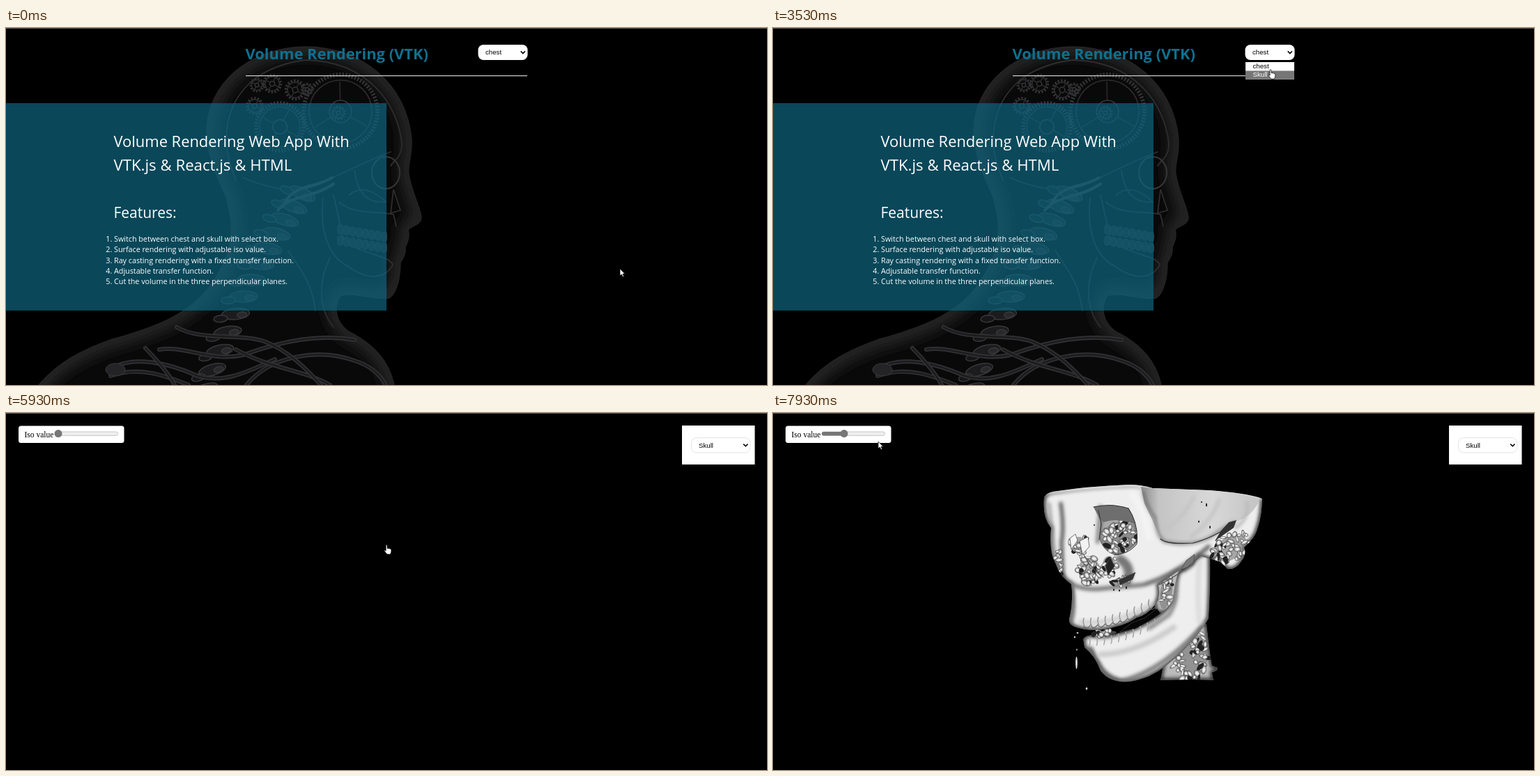
Animation of 1092x513 px, one loop 8000 ms. Source, as an HTML page:

```html
<!DOCTYPE html>
<html lang="en">
<head>
<meta charset="utf-8">
<title>Volume Rendering</title>
<style>
html, body { margin: 0; width: 100%; height: 100%; overflow: hidden; background: #000; }
svg { display: block; width: 1092px; height: 513px; }
.sans { font-family: "Open Sans", "Noto Sans", sans-serif; fill: #fff; }
.ui { font: 9.7px "Liberation Sans", Arial, sans-serif; }
.iso { font: 11.5px "Liberation Serif", "Times New Roman", serif; }
</style>
</head>
<body>
<svg id="stage" viewBox="0 0 1092 513">
  <defs>
    <filter id="mist" filterUnits="userSpaceOnUse" x="0" y="0" width="1092" height="513"><feGaussianBlur stdDeviation=".7"/></filter>
    <filter id="soft" filterUnits="userSpaceOnUse" x="0" y="0" width="1092" height="513"><feGaussianBlur stdDeviation="2.6"/></filter>
    <filter id="wide" filterUnits="userSpaceOnUse" x="0" y="0" width="1092" height="513"><feGaussianBlur stdDeviation="10"/></filter>
    <radialGradient id="lump"><stop stop-color="#fff"/><stop offset=".5" stop-color="#dcdcdc"/><stop offset=".85" stop-color="#808080"/><stop offset="1" stop-color="#333"/></radialGradient>
    <linearGradient id="temple" x1="0" x2="1"><stop stop-color="#8a8a8a"/><stop offset=".15" stop-color="#c4c4c4"/><stop offset=".6" stop-color="#d8d8d8"/><stop offset="1" stop-color="#c4c4c4"/></linearGradient>
  </defs>
  <g id="home">
    <g id="xray" fill="none"></g>
    <path d="M0 108H546V406H0Z" fill="#0e667f" fill-opacity=".7"/>
    <text x="343.5" y="44.5" class="sans" style="font-size:21.9px;font-weight:700;fill:#0f708f">Volume Rendering (VTK)</text>
    <path d="M344 68.7H748" stroke="#ccc" stroke-width="1.2"/>
    <g class="sans" id="copy"></g>
    <rect x="677.5" y="24" width="71" height="22" rx="7.5" fill="#fff"/>
    <text x="688" y="38" class="ui">chest</text>
    <path d="M738.7 33.4L741.8 36.5L744.9 33.4" fill="none" stroke="#000" stroke-width="1.6"/>
    <g id="menu" class="ui">
      <path d="M678 49H748V74H678Z" fill="#fff"/>
      <rect id="mark" x="678" width="70" height="12.3" fill="#767676"/>
      <text id="optA" x="688.5" y="58">chest</text>
      <text id="optB" x="688.5" y="70.2">Skull</text>
    </g>
  </g>
  <g id="view">
    <g id="skull"></g>
    <rect x="18" y="18.5" width="151.5" height="24.5" rx="3.5" fill="#fff"/>
    <text x="26.5" y="35" class="iso">Iso value</text>
    <rect x="70" y="27" width="90.5" height="5.4" rx="2.7" fill="#efefef" stroke="#b5b5b5" stroke-width=".7"/>
    <rect id="fill" x="70" y="27" height="5.4" rx="2.7" fill="#767676"/>
    <circle id="thumb" cy="29.6" r="5.5" fill="#767676"/>
    <path d="M970 18H1074.5V74H970Z" fill="#fff"/>
    <rect x="983.5" y="35.7" width="84.5" height="21.3" rx="7.5" fill="#fff" stroke="#dcdcdc" stroke-width=".8"/>
    <text x="994" y="49.6" class="ui">Skull</text>
    <path d="M1058.2 44.6L1061.3 47.7L1064.4 44.6" fill="none" stroke="#000" stroke-width="1.6"/>
  </g>
  <path d="M0 .5H1092" stroke="#555"/>
  <g id="cursor" fill="#fff" stroke="#000" stroke-width=".7">
    <path id="arrow" d="M0 0V10L2.3 8L4 11.6L5.6 11L4 7.3H7Z"/>
    <path id="hand" d="M-.9 7.5V.8Q-.9-.4 .1-.4T1.1 .8V4.5Q4 4.3 6.5 5.6Q7.3 7 6.7 9.8L5.6 13H.8L-1.6 10Q-3.7 7.8-3.2 7.2T-.9 8.2Z"/>
  </g>
</svg>
<script>
const $ = id => document.getElementById(id);
const set = (node, attrs) => { for (const k in attrs) node.setAttribute(k, attrs[k]); return node; };
function el(parent, tag, attrs, text) {
  const node = set(document.createElementNS("http://www.w3.org/2000/svg", tag), attrs);
  if (text) node.textContent = text;
  return parent.appendChild(node);
}
const line = (parent, d, stroke, width = 1) =>
  el(parent, "path", { d, stroke, fill: "none", "stroke-width": width, "stroke-linecap": "round" });
let seed = 11;
const rnd = () => (seed = seed * 16807 % 2147483647) / 2147483647;

// A filled outline whose rim fades softly inward; returns the clipped group.
let clips = 0;
function solid(parent, d, fill, rim, width, filter) {
  const id = "clip" + clips++;
  el(el(parent, "clipPath", { id }), "path", { d });
  const g = el(parent, "g", { "clip-path": `url(#${id})` });
  el(g, "path", { d, fill });
  set(line(g, d, rim, width), { filter: `url(#${filter})` });
  return g;
}

// Page copy
const copy = $("copy");
[["Volume Rendering Web App With", 170.5, 21.9], ["VTK.js & React.js & HTML", 204.5, 22.2], ["Features:", 272.5, 21]]
  .forEach(([s, y, size]) => el(copy, "text", { x: 154.5, y, "font-size": size }, s));
["Switch between chest and skull with select box.", "Surface rendering with adjustable iso value.",
  "Ray casting rendering with a fixed transfer function.", "Adjustable transfer function.",
  "Cut the volume in the three perpendicular planes."].forEach((s, i) => {
  const y = 306.8 + i * 15.4, size = 10.75;
  el(copy, "text", { x: 152.3, y, "font-size": size, "text-anchor": "end" }, i + 1 + ".");
  el(copy, "text", { x: 155, y, "font-size": size }, s);
});

// Backdrop: translucent head, gears and bones
const xray = $("xray");
const head = "M47 513C75 480 110 462 150 448C215 430 270 410 300 360C325 320 330 290 315 240C295 200 285 165 289 135" +
  "C297 70 360 27 430 27C510 27 575 80 582 160C583 185 576 195 578 210C582 235 596 262 596 272C596 283 582 284 577 290" +
  "C580 300 576 308 573 315C574 325 570 330 566 337C566 355 562 380 550 388C530 392 495 378 480 385C470 400 472 420 490 435" +
  "C530 455 550 480 557 513";
solid(xray, head, "#090909", "#252527", 26, "wide");
line(xray, head, "#252527", 1.3);
const bones = el(xray, "g", { filter: "url(#mist)" });
["M330 218C298 150 318 60 430 46C520 48 562 110 568 165C568 188 556 190 552 198", "M340 215C380 232 420 240 455 222C490 205 520 190 552 178",
  "M455 245C450 290 462 328 490 342C520 364 545 360 555 340C548 325 505 326 484 302L470 240",
  "M478 250C500 270 535 262 556 268L560 285M500 205C505 240 520 252 545 250M556 232L566 262L552 266Z",
  "M405 320C425 350 440 370 444 406M465 330C450 360 446 400 470 430", "M492 240C510 225 530 235 545 250"]
  .forEach(d => line(bones, d, "#2e2e30", 1.8));
el(bones, "ellipse", { cx: 545, cy: 208, rx: 20, ry: 23, stroke: "#363638", "stroke-width": 2 });

function gear(x, y, r, spokes = 4) {
  const tooth = 2 * Math.PI * r / Math.round(r * 1.4) / 2;
  el(bones, "circle", { cx: x, cy: y, r, stroke: "#343436", "stroke-width": Math.min(6, r * .35), "stroke-dasharray": tooth });
  el(bones, "circle", { cx: x, cy: y, r: r * .85, stroke: "#2c2c2e", "stroke-width": 1.6 });
  el(bones, "circle", { cx: x, cy: y, r: r * .3, stroke: "#38383a", "stroke-width": 1.5 });
  for (let i = 0; i < spokes; i++) {
    const a = i * 2 * Math.PI / spokes + .5, c = Math.cos(a), s = Math.sin(a);
    line(bones, `M${x + c * r * .3} ${y + s * r * .3}L${x + c * r * .8} ${y + s * r * .8}`, "#2b2b2d", 1.5);
  }
}
gear(480, 120, 53, 3); gear(415, 89, 13); gear(357, 112, 11); gear(477, 122, 9);
gear(393, 142, 34); gear(382, 80, 12); gear(432, 88, 8); gear(360, 82, 9);

for (let i = 0; i < 8; i++) {
  const x = 476 + i * 9, y = 283 + i * 1.5;
  for (const dy of [0, 16])
    el(bones, "rect", { x, y: y + dy, width: 7.5, height: 13, rx: 3, stroke: "#3a3a3c", fill: "#222224" });
}
for (let i = 0; i < 13; i++) {
  const u = i / 12, v = 1 - u;
  const x = v * v * 425 + 2 * u * v * 350 + u * u * 285, y = v * v * 238 + 2 * u * v * 345 + u * u * 520;
  const g = el(bones, "g", { transform: `translate(${x} ${y}) rotate(${25 - u * 45})`, stroke: "#39393b", "stroke-width": 1.4 });
  el(g, "ellipse", { rx: 20, ry: 8, fill: "#1c1c1e" });
  el(g, "ellipse", { cx: -22, cy: 5, rx: 10, ry: 5, fill: "#161618" });
  el(g, "ellipse", { cx: 9, cy: 2, rx: 7, ry: 4, fill: "#29292b" });
}
line(bones, "M390 262C410 238 438 246 470 224M400 250C420 222 440 232 468 215", "#3c3c3e", 4);
["M148 492C180 468 235 482 275 500C315 512 350 492 386 476", "M150 500C190 486 225 498 262 513",
  "M220 462C258 456 292 480 340 470C400 448 450 440 500 448", "M345 513C380 470 450 460 500 478C525 486 538 500 545 513",
  "M330 462C380 490 430 492 465 513", "M245 430C280 450 330 438 370 450C410 465 440 500 452 513", "M200 460C216 476 236 500 242 513"]
  .forEach(d => { line(bones, d, "#323234", 6); line(bones, d, "#1c1c1e", 2.6); });
el(bones, "ellipse", { cx: 157, cy: 491, rx: 14, ry: 9, fill: "#242426", stroke: "#3a3a3c" });

// Bone surface
const skull = $("skull");
const bone = (d, fill = "#eee") => solid(skull, d, fill, "#333", 6, "soft");
function shade(g, strokes) {
  const layer = el(g, "g", { filter: "url(#soft)" });
  strokes.forEach(([d, color, width]) => line(layer, d, color, width));
}
// Clusters of rounded fragments with dark hollows between them.
function rough(g, cx, cy, rx, ry, n, tilt = 0) {
  const layer = el(g, "g", { transform: `translate(${cx} ${cy}) rotate(${tilt})` });
  el(layer, "ellipse", { rx: rx * .85, ry: ry * .85, fill: "#777", opacity: .6 });
  for (let i = 0; i < n; i++) {
    const a = rnd() * 6.28, k = Math.sqrt(rnd());
    const x = Math.cos(a) * rx * k, y = Math.sin(a) * ry * k;
    el(layer, "ellipse", { rx: 2.5 + rnd() * 4.5, ry: 1.5 + rnd() * 2.5, fill: i % 6 == 5 ? "#222" : "url(#lump)",
      transform: `translate(${x} ${y}) rotate(${rnd() * 180})` });
  }
}

const neck = bone("M556 384L562 350L600 302L622 303L627 345L630 363L638 366L637 370L630 373L632 384L600 383Z", "#bbb");
rough(neck, 600, 348, 28, 38, 65);
const gap = bone("M540 240L580 215L592 235L576 285L550 288Z", "#bbb");
rough(gap, 564, 258, 10, 28, 14, 10);

const jaw = bone("M445 325Q450 318 462 320Q480 322 497 316Q520 311 540 299Q565 285 574 268Q577 240 582 228Q600 222 612 204" +
  "L627 200Q628 250 625 295Q612 318 590 340Q565 366 540 378Q515 388 500 386Q480 384 470 370Q462 348 447 337Z");
shade(jaw, [["M455 340Q468 378 496 386", "#666", 9], ["M497 386Q560 372 624 298", "#777", 6],
  ["M470 347Q520 346 575 308", "#ccc", 8], ["M577 240Q582 270 568 290L540 309", "#888", 6], ["M612 215Q608 255 612 300", "#ddd", 8]]);

const cranium = bone("M389 121Q392 115 402 113Q455 105 512 103Q528 103 545 108L625 111Q680 115 702 123Q702 145 696 164" +
  "Q692 180 676 193Q680 204 672 213Q664 226 652 224Q640 210 628 210L612 205Q600 222 580 228Q566 238 553 247Q557 266 548 276" +
  "Q536 291 522 294Q508 304 492 307Q460 317 432 307Q422 302 426 292Q431 270 428 246Q412 236 405 215Q396 200 399 165Q386 150 389 121Z");
shade(cranium, [["M392 113Q455 106 512 103Q528 104 545 109L625 112Q680 116 698 122", "#e8e8e8", 8],
  ["M413 130Q418 165 414 185L416 235", "#555", 5], ["M396 130Q400 165 404 210", "#999", 4],
  ["M425 245Q450 256 475 252L530 247", "#777", 6], ["M428 255Q434 280 428 300", "#777", 5],
  ["M470 135L466 185", "#888", 6], ["M498 210Q516 222 508 240", "#777", 13],
  ["M534 246Q580 232 625 192", "#666", 6], ["M516 116Q532 140 540 180", "#f4f4f4", 8], ["M440 300Q490 306 545 274", "#ccc", 5]]);
el(cranium, "path", { d: "M528 106L545 108L625 111Q680 116 698 124Q690 148 662 157Q640 175 605 187Q575 191 558 184Q550 165 533 130Z", fill: "url(#temple)" });
shade(cranium, [["M531 113Q536 135 548 150Q551 178 562 185Q600 193 627 179Q648 164 662 157", "#666", 3],
  ["M560 170Q590 150 604 120M600 178Q630 155 640 125", "#c4c4c4", 5], ["M680 128Q684 150 664 165", "#bbb", 5]]);
line(skull, "M556 181Q565 189 602 187Q628 181 660 160", "#333", 1.2);
rough(cranium, 656, 194, 31, 19, 50, -35);
el(skull, "path", { d: "M654 157L665 154L661 165L648 174L634 184L643 169Z", fill: "#333" });

// Eye socket, nose and cheek
const socket = solid(skull, "M460 135Q485 129 510 137Q522 155 523 185Q510 202 490 204Q473 198 468 180L470 155Z", "#aaa", "#333", 3, "soft");
rough(socket, 496, 178, 26, 25, 60);
el(socket, "path", { d: "M460 135Q485 129 510 137Q519 148 520 160Q495 150 474 157L468 150Z", fill: "#6e6e6e" });
line(skull, "M460 135Q485 129 510 137Q525 160 522 188Q510 203 490 204M467 140L471 160L468 182", "#333", 1.1);
rough(cranium, 439, 190, 15, 14, 18);
rough(cranium, 454, 226, 19, 20, 42, -20);
rough(cranium, 482, 219, 11, 16, 18);
rough(cranium, 409, 215, 6, 20, 14);
rough(cranium, 500, 243, 16, 6, 14, -20);
[["M484 208L490 220L481 233L477 220Z", "#222"], ["M496 240L520 229L516 239L498 247Z", "#333"], ["M586 225L593 212L605 203L603 218Z", "#777"],
  ["M426 180L434 174L437 183L428 196Z", "#f5f5f5"], ["M440 184L452 178L454 192L444 203Z", "#f2f2f2"],
  ["M497 315L514 302L534 294L551 281L556 288L540 299L520 310Z", "#080808"]]
  .forEach(([d, fill]) => el(skull, "path", { d, fill, stroke: "#444", "stroke-width": .7 }));
line(skull, "M446 204Q458 226 474 236M554 247Q590 229 612 206", "#555", 1.1);

// Teeth
const teeth = el(skull, "g", { filter: "url(#mist)" });
for (let i = 0; i < 10; i++) {
  const x = 446 + i * 10.4, y = 302 - i * i * .33;
  line(teeth, `M${x} ${y - 7}Q${x - 2} ${y} ${x + 1} ${y + 4}`, "#999", 1.6);
  line(teeth, `M${x} ${y + 5}Q${x + 5} ${y + 10} ${x + 10} ${y + 2}`, "#666", 1.2);
  line(teeth, `M${x + 8} ${y + 21}Q${x + 10} ${y + 27} ${x + 8} ${y + 32}`, "#aaa", 1.6);
}
rough(skull, 476, 317, 20, 4, 14, -6);
[[622, 132, 2.5], [611, 156, 1.5], [627, 164, 2], [615, 128, 1], [461, 161, 1], [489, 254, 1.5], [497, 255, 1.5], [507, 251, 2]]
  .forEach(([cx, cy, ry]) => el(skull, "ellipse", { cx, cy, rx: 1, ry, fill: "#111" }));
[[435.5, 359, 1.4, 9], [450, 396, 1.3, 1.8], [437, 316, 1.5, 1], [433, 322, 1, 1.5], [436, 340, .7, 1.5]]
  .forEach(([cx, cy, rx, ry]) => el(skull, "ellipse", { cx, cy, rx, ry, fill: "#ddd" }));

// Pointer route: time, x, y
const route = [[0, 881, 346], [70, 870, 338], [270, 650, 150], [470, 400, 21], [670, 251, 150], [870, 273, 286], [1070, 480, 240],
  [1270, 814, 12], [1470, 755, 62], [1730, 755, 33], [2130, 723, 37], [2870, 723, 37], [3670, 712, 65], [5540, 712, 65],
  [5930, 546, 190], [6400, 535, 216], [6670, 514, 202], [6930, 760, 150], [7270, 1040, 60], [7470, 800, 98], [7730, 300, 52], [7930, 151, 41]];
function pointer(t) {
  const i = route.findIndex(p => p[0] > t);
  if (i < 0) return route.at(-1).slice(1);
  const [a, x, y] = route[i - 1], [b, x2, y2] = route[i], u = (t - a) / (b - a);
  return [x + (x2 - x) * u, y + (y2 - y) * u];
}
const show = (id, on) => { $(id).style.display = on ? "" : "none"; };

function draw(now) {
  const t = Math.round(Math.floor((now % 8000 + 3.5) / (1000 / 15)) * 20 / 3) * 10;
  const [x, y] = pointer(t);
  const viewing = t >= 4930, loaded = t >= 6200, second = t >= 3270;
  const hand = t >= 3200 && !(viewing && x < 170);
  show("home", !viewing);
  show("view", viewing);
  show("menu", t >= 2470 && t < 4800);
  show("skull", loaded);
  set($("mark"), { y: second ? 61.5 : 49.2 });
  set($("optA"), { fill: second ? "#000" : "#fff" });
  set($("optB"), { fill: second ? "#fff" : "#000" });
  set($("thumb"), { cx: loaded ? 102 : 75 });
  set($("fill"), { width: loaded ? 32 : 5 });
  show("hand", hand);
  show("arrow", !hand);
  set($("cursor"), { transform: `translate(${x} ${y})` });
}
const start = performance.now();
function tick() {
  draw(performance.now() - start);
  requestAnimationFrame(tick);
}
tick();
</script>
</body>
</html>
```
